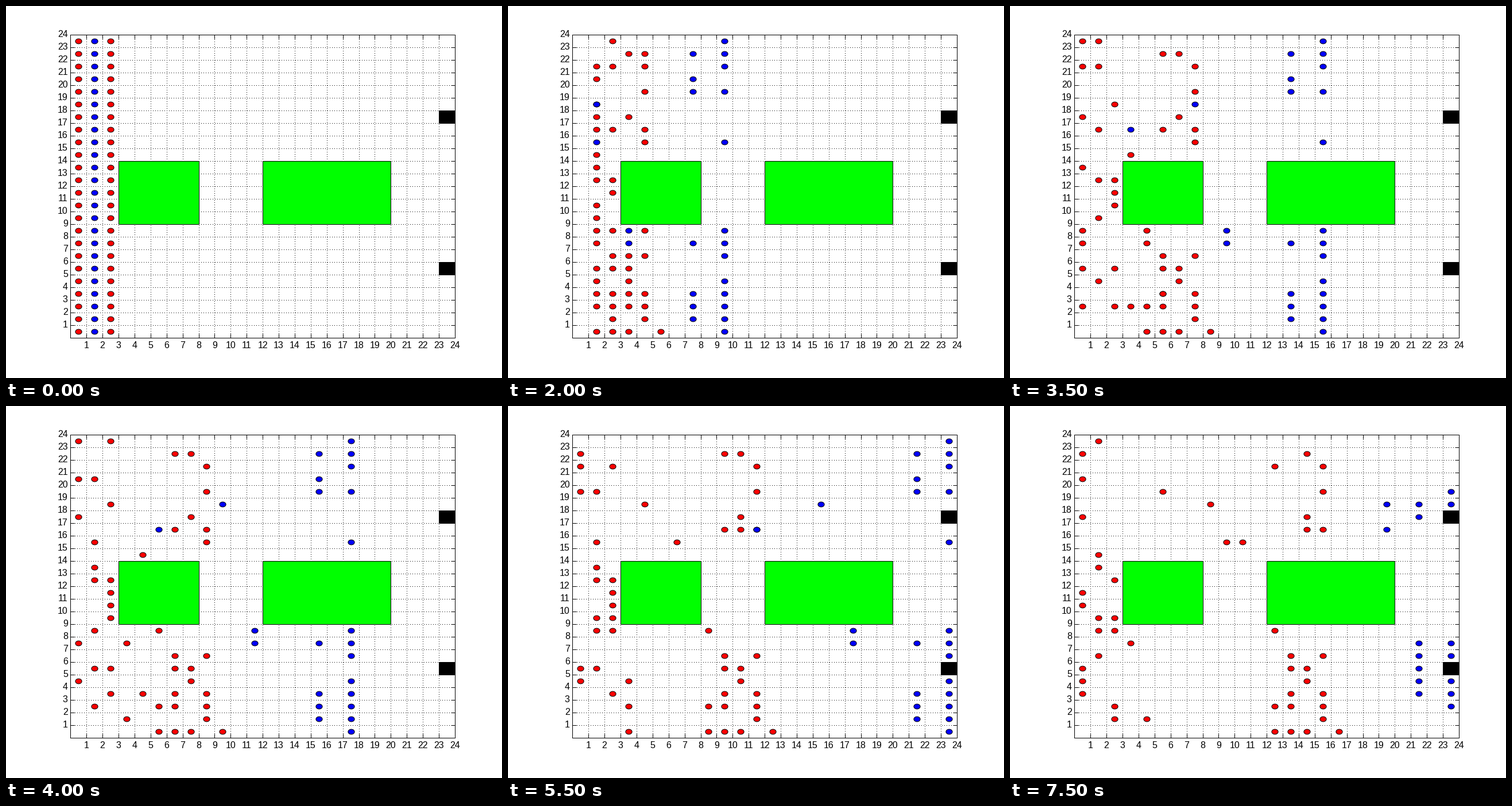
These frames come from a looping animation (864x648 px, 8 s). A matplotlib script:

```python
import random

import matplotlib.pyplot as plt
from matplotlib.animation import FuncAnimation
from matplotlib.collections import EllipseCollection
from matplotlib.patches import Rectangle

W, H, DPI = 864, 648, 72
STEPS, STEP_MS = 16, 500
N = 24
SPREAD = 4      # step at which the red crowd has left its two columns
STRAYS = 28

WALLS = [(3, 9, 5, 5), (12, 9, 8, 5)]
DOORS = [(23, 17), (23, 5)]

# Red marchers, one cell per step: row -> column minus step
MARCH = {0: (1, -1, -2, -3), 1: (0,), 2: (0, -2, -3), 3: (0, -2), 4: (-1,),
         5: (-1, -2), 6: (0, -2), 8: (-3,), 16: (0,), 17: (-1,), 21: (0,),
         22: (-1,)}

# Blue runners, two cells per step: rows of those who start at once,
# and (row, lag) of those who first change lanes
PROMPT = [0, 1, 2, 3, 4, 6, 7, 8, 15, 19, 21, 22, 23]
LATE = [(1, 1), (2, 1), (3, 1), (7, 1), (7, 3), (8, 3), (16, 6), (18, 4),
        (19, 1), (20, 1), (22, 1)]

plt.rcParams["font.family"] = "Liberation Sans"


def blend(a, b, part):
    return int(a + (b - a) * part + 0.5)


def walkable(cell):
    c, r = cell
    walled = any(x <= c < x + w and y <= r < y + h for x, y, w, h in WALLS)
    return 0 <= c < N and 0 <= r < N and not walled


def marchers(step):
    return [(step + k, row) for row, ks in MARCH.items() for k in ks]


def place_strays(rng):
    taken = set(marchers(SPREAD))
    strays = []
    for i in range(STRAYS):
        row = blend(1, N - 1, i / (STRAYS - 1))
        cell = rng.choice([(c, row) for c in range(1, 5)
                           if walkable((c, row)) and (c, row) not in taken])
        taken.add(cell)
        strays.append(cell)
    return strays


def wander(strays, step, rng):
    """North of the wall most walk on; the others drift around."""
    taken = set(marchers(step)) | set(strays)
    moved = []
    for c, r in strays:
        eager = r > 14 and c > 2 and rng.random() < 0.75
        dc, dr = (1, 0) if eager else rng.choice(
            [(0, 0), (1, 0), (-1, 0), (0, 1), (0, -1)])
        target = (c + dc, r + dr)
        if walkable(target) and target not in taken:
            taken.discard((c, r))
            taken.add(target)
            moved.append(target)
        else:
            moved.append((c, r))
    return moved


def red_crowd():
    rng = random.Random(7)
    strays = place_strays(rng)
    # Both starting columns are filled in row order
    goals = sorted(marchers(SPREAD) + strays, key=lambda p: p[::-1])
    frames = []
    for step in range(SPREAD):
        across = max(0, step - 2) / 2
        frames.append([(blend(2 * (i % 2), c, across),
                        blend(i // 2, r, step / SPREAD))
                       for i, (c, r) in enumerate(goals)])
    for step in range(SPREAD, STEPS):
        if step > SPREAD:
            strays = wander(strays, step, rng)
        frames.append(marchers(step) + strays)
    return frames


def door_row(row):
    return min((r for _, r in DOORS), key=lambda r: abs(r - row))


def run(cells):
    """Dash right, then queue along the edge; a door takes one per step."""
    taken, open_doors = set(cells), set(DOORS)
    stay = []

    def free(cell):
        return cell not in taken and (cell not in DOORS or cell in open_doors)

    for c, r in sorted(cells, key=lambda p: (-p[0], abs(p[1] - door_row(p[1])))):
        taken.remove((c, r))
        if c < 23 and free((c + 2, r)):
            c += 2
        elif c >= 21:
            for _ in range(2):
                goal = door_row(r)
                ahead = r + (goal > r) - (goal < r)
                if free((c, ahead)):
                    r = ahead
        if (c, r) in DOORS:
            open_doors.discard((c, r))
        else:
            taken.add((c, r))
            stay.append((c, r))
    return stay


def blue_crowd():
    spare = [r for r in range(N) if r not in PROMPT]
    active = [(1, r) for r in PROMPT]
    frames = []
    for step in range(STEPS):
        if step:
            active = run(active)
        active += [(1, row) for row, lag in LATE if lag == step]
        waiting = [(1, blend(first, row, step / lag))
                   for first, (row, lag) in zip(spare, LATE) if step < lag]
        frames.append(active + waiting)
    return frames


fig = plt.figure(figsize=(W / DPI, H / DPI), dpi=DPI, facecolor="white")
ax = fig.add_axes([0.13, 0.11 - 1 / H, 0.775, 0.815])
ax.set(xlim=(0, N), ylim=(0, N))
ax.set_axisbelow(True)
ticks = range(1, N + 1)
ax.set_xticks(ticks)
ax.set_yticks(ticks)
ax.tick_params(direction="in", length=6.7, width=1, top=True, right=True,
               labelbottom=False, labelleft=False)
# Half a pixel of dash offset puts each dot on one whole pixel
ax.grid(color="black", linewidth=1, linestyle=(0.5, (1, 3)))
for spine in ax.spines.values():
    spine.set_linewidth(1)


def label(text, at, shift, ha):
    ax.annotate(text, at, xytext=shift, textcoords="offset points",
                ha=ha, va="baseline", fontsize=16)


for n in ticks:
    label(str(n), (n, 0), (0, -18), "center")
    label(str(n), (0, n), (-4.5, -4.7), "right")


def block(x, y, w, h, color):
    ax.add_patch(Rectangle((x, y), w, h, facecolor=color, edgecolor="black",
                           linewidth=1))


for wall in WALLS:
    block(*wall, "lime")
for door in DOORS:
    block(*door, 1, 1, "black")


def dots(color):
    group = EllipseCollection([0.4], [0.4], [0], units="xy", offsets=[(0, 0)],
                              offset_transform=ax.transData, facecolors=color,
                              edgecolors="black", linewidths=1,
                              antialiaseds=False, zorder=3)
    return ax.add_collection(group, autolim=False)


crowds = [(dots("red"), red_crowd()), (dots("blue"), blue_crowd())]


def draw(step):
    for group, frames in crowds:
        group.set_offsets([(c + 0.5, r + 0.5) for c, r in frames[step]])
    return [group for group, _ in crowds]


anim = FuncAnimation(fig, draw, frames=STEPS, interval=STEP_MS, repeat=True)
plt.show()
```
